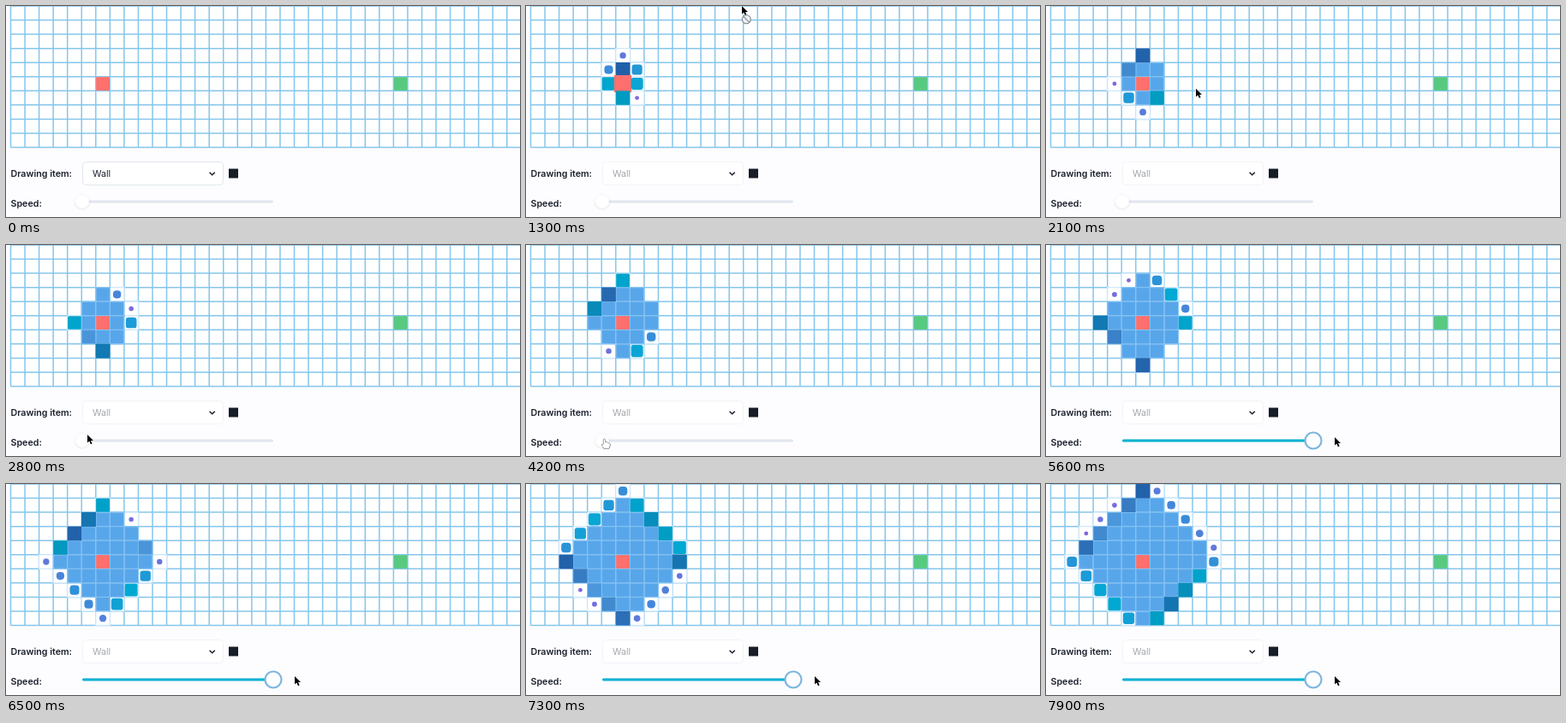
Animation of 600x247 px, one loop 8000 ms. Source, as an HTML page with a canvas:

```html
<!DOCTYPE html>
<html lang="en">
<head>
<meta charset="utf-8">
<title>Grid search</title>
<style>
html, body { margin: 0; width: 100%; height: 100%; overflow: hidden; background: #fdfdff; }
canvas { display: block; width: 600px; height: 247px; }
</style>
</head>
<body>
<canvas id="stage"></canvas>
<script>
const LOOP = 8000, STEP = 100;
const W = 600, H = 247;
const CELL = 16.55, LEFT = 5.5, ROWS = 10;
const START = { col: 6, row: 5 }, GOAL = { col: 27, row: 5 };
const TRACK = { x0: 89, x1: 312, y: 229 };
const FONT = 'Inter, "Open Sans", sans-serif';

const canvas = document.getElementById('stage');
const ratio = window.devicePixelRatio || 1;
canvas.width = W * ratio;
canvas.height = H * ratio;
const ctx = canvas.getContext('2d');
ctx.scale(ratio, ratio);

// Interpolates rows of [position, ...values].
function sample(rows, p) {
  if (p <= rows[0][0]) return rows[0].slice(1);
  for (let i = 1; i < rows.length; i++) {
    const a = rows[i - 1], b = rows[i];
    if (p <= b[0]) {
      const k = (p - a[0]) / (b[0] - a[0]);
      return a.slice(1).map((v, j) => v + (b[j + 1] - v) * k);
    }
  }
  return rows[rows.length - 1].slice(1);
}

// Cell life: age, scale / age, red, green, blue
const SCALE = [[0, .3], [700, 1], [900, 1.1], [1280, 1]];
const COLOR = [
  [0, 130, 102, 224], [650, 0, 170, 212], [820, 0, 155, 192],
  [960, 32, 96, 168], [1280, 88, 166, 234]
];
const START_SCALE = [[200, 1], [1250, 1.32], [1600, 1]];

// Start time by visiting index; even pace after the last single steps.
const PACE = [
  340, 480, 600, 700, 820, 950, 1130, 1290, 1600, 1900, 2090, 2290,
  2500, 2740, 3200, 3340, 3480, 3600, 3830, 4090, 4490, 4620, 4700, 4880,
  4960, 5170, 5300, 5530, 5590
].map((t, i) => [i, t]).concat([[34, 6090], [54, 7290], [66, 7890], [68, 7990]]);

// One ring of the search: both upper quadrants, up, both lower ones, down, left, right.
function ring(n) {
  const quadrant = (sx, sy) => {
    const cells = [];
    for (let x = 1; x < n; x++) cells.push([x, n - x]);
    cells.sort((a, b) => Math.max(...a) - Math.max(...b) || a[0] - b[0]);
    return cells.map(([x, y]) => [x * sx, y * sy]);
  };
  return [
    ...quadrant(1, -1), ...quadrant(-1, -1), [0, -n],
    ...quadrant(1, 1), ...quadrant(-1, 1), [0, n], [-n, 0], [n, 0]
  ];
}

const visits = [1, 2, 3, 4, 5, 6].flatMap(ring)
  .map(([x, y]) => ({ col: START.col + x, row: START.row + y }))
  .filter(c => c.row >= 0 && c.row < ROWS && c.col >= 0)
  .slice(0, 67)
  .map((c, i) => ({ ...c, time: sample(PACE, i)[0] }));

const painted = [...visits, { ...START, start: true }]
  .sort((a, b) => a.row - b.row || a.col - b.col);

const cellX = col => LEFT + col * CELL;
const cellY = row => row * CELL;

function box(x, y, w, h, r) {
  ctx.beginPath();
  ctx.roundRect(x, y, w, h, r);
}

function block(cell, size, radius, color) {
  const x = cellX(cell.col) + CELL / 2, y = cellY(cell.row) + CELL / 2;
  box(x - size / 2, y - size / 2, size, size, radius);
  ctx.fillStyle = color;
  ctx.fill();
}

function drawGrid() {
  ctx.fillStyle = '#fff';
  ctx.fillRect(LEFT, 0, W, ROWS * CELL);
  ctx.beginPath();
  for (let x = LEFT; x < W; x += CELL) {
    ctx.moveTo(x, 0);
    ctx.lineTo(x, ROWS * CELL);
  }
  for (let r = 0; r <= ROWS; r++) {
    ctx.moveTo(LEFT, cellY(r));
    ctx.lineTo(W, cellY(r));
  }
  ctx.strokeStyle = '#85c6ec';
  ctx.lineWidth = 1.5;
  ctx.stroke();
}

function drawCells(t) {
  for (const late of [true, false]) {
    for (const c of visits) {
      const age = t - c.time;
      if (age < 0 || (age < 1000) !== late) continue;
      ctx.fillStyle = '#fff';
      ctx.fillRect(cellX(c.col), cellY(c.row), CELL, CELL);
      ctx.strokeStyle = late ? '#d2e9fa' : '#88c6f4';
      ctx.lineWidth = 1.3;
      ctx.strokeRect(cellX(c.col), cellY(c.row), CELL, CELL);
    }
  }
  for (const c of painted) {
    if (c.start) {
      block(c, 15.8 * sample(START_SCALE, t)[0], 0, '#fd706d');
      continue;
    }
    const age = t - c.time;
    if (age < 0) continue;
    const size = 15.6 * sample(SCALE, age)[0];
    const round = Math.max(0, Math.min(.5, .7 * (1 - age / 800)));
    block(c, size, size * round, `rgb(${sample(COLOR, age).map(Math.round)})`);
  }
  block(GOAL, 15.8, 0, '#58ca80');
}

function text(str, x, y, weight, color) {
  ctx.font = `${weight} 10.7px ${FONT}`;
  ctx.fillStyle = color;
  ctx.fillText(str, x, y);
}

function drawForm(off) {
  text('Drawing item:', 5.5, 200, 600, '#1a202c');
  text('Speed:', 5.5, 235, 600, '#1a202c');
  box(89.5, 182.5, 164, 27, 4);
  ctx.fillStyle = '#fff';
  ctx.fill();
  ctx.strokeStyle = off ? '#f1f3f7' : '#e0e6ee';
  ctx.lineWidth = 1;
  ctx.stroke();
  text('Wall', 101, 200, 400, off ? '#a3a6ab' : '#1a202c');
  ctx.beginPath();
  ctx.moveTo(237.6, 194.7);
  ctx.lineTo(240.7, 197.8);
  ctx.lineTo(243.8, 194.7);
  ctx.strokeStyle = '#1a202c';
  ctx.lineWidth = 1.5;
  ctx.stroke();
  ctx.fillStyle = '#171c26';
  ctx.fillRect(260, 190.5, 11, 11);
}

function drawSlider(t) {
  const [x] = sample([[4450, TRACK.x0], [5200, TRACK.x1]], t);
  const { x0, x1, y } = TRACK;
  box(x0, y - 1.5, x1 - x0, 3, 1.5);
  ctx.fillStyle = '#e0e5ee';
  ctx.fill();
  const focus = t >= 4450;
  if (focus) {
    box(x0, y - 1.5, x - x0, 3, 1.5);
    ctx.fillStyle = '#06b2d3';
    ctx.fill();
  }
  ctx.save();
  if (!focus) {
    ctx.shadowColor = 'rgba(0,0,0,.14)';
    ctx.shadowBlur = 2.5 * ratio;
    ctx.shadowOffsetY = .6 * ratio;
  }
  ctx.beginPath();
  ctx.arc(x, y, focus ? 9.5 : 8, 0, Math.PI * 2);
  ctx.fillStyle = '#fff';
  ctx.fill();
  ctx.restore();
  if (focus) {
    ctx.strokeStyle = '#7db6df';
    ctx.lineWidth = 2.2;
    ctx.stroke();
  }
}

const ARROW = new Path2D('M0 0V9.6L2.3 7.6L3.9 11.2L5.6 10.4L4 7H7Z');
const HAND = new Path2D(
  'M-1.6 .8Q-.4 -.4 .6 1V4Q2 3 2.8 4.4Q4.2 4 4.6 5.2Q6 5 6 6.6Q6 9.5 4.6 11.4H-.8' +
  'Q-1.6 9.6 -3.6 7.4Q-4 5.8 -1.6 6.6Z');
const PATH = [
  [1100, 268, -14], [1300, 252, 0], [1800, 215, 34], [2700, 95, 222], [2900, 95, 222],
  [3200, 92, 227], [4450, 92, 227], [5200, 312, 227], [5400, 337, 225]
];

function drawCursor(t) {
  if (t < 1200) return;
  const [x, y] = sample(PATH, t);
  const hand = t >= 3100 && t < 5300;
  ctx.save();
  ctx.translate(x, y);
  ctx.lineJoin = 'round';
  ctx.lineWidth = hand ? 1 : 1.4;
  ctx.strokeStyle = hand ? '#222' : '#fff';
  ctx.stroke(hand ? HAND : ARROW);
  ctx.fillStyle = hand ? '#fff' : '#000';
  ctx.fill(hand ? HAND : ARROW);
  if (t < 1600) {
    ctx.beginPath();
    ctx.arc(5.3, 15.7, 5, 0, Math.PI * 2);
    ctx.fillStyle = '#eef0f3';
    ctx.fill();
    ctx.moveTo(1.9, 12.3);
    ctx.lineTo(8.7, 19.1);
    ctx.strokeStyle = '#8d949e';
    ctx.lineWidth = 1.3;
    ctx.stroke();
  }
  ctx.restore();
}

function draw(t) {
  ctx.fillStyle = '#fdfdff';
  ctx.fillRect(0, 0, W, H);
  drawGrid();
  drawCells(t);
  drawForm(t >= 200);
  drawSlider(t);
  drawCursor(t);
}

const begin = performance.now();
function tick() {
  const t = (performance.now() - begin) % LOOP;
  draw(Math.floor(t / STEP) * STEP);
  requestAnimationFrame(tick);
}
tick();
</script>
</body>
</html>
```
